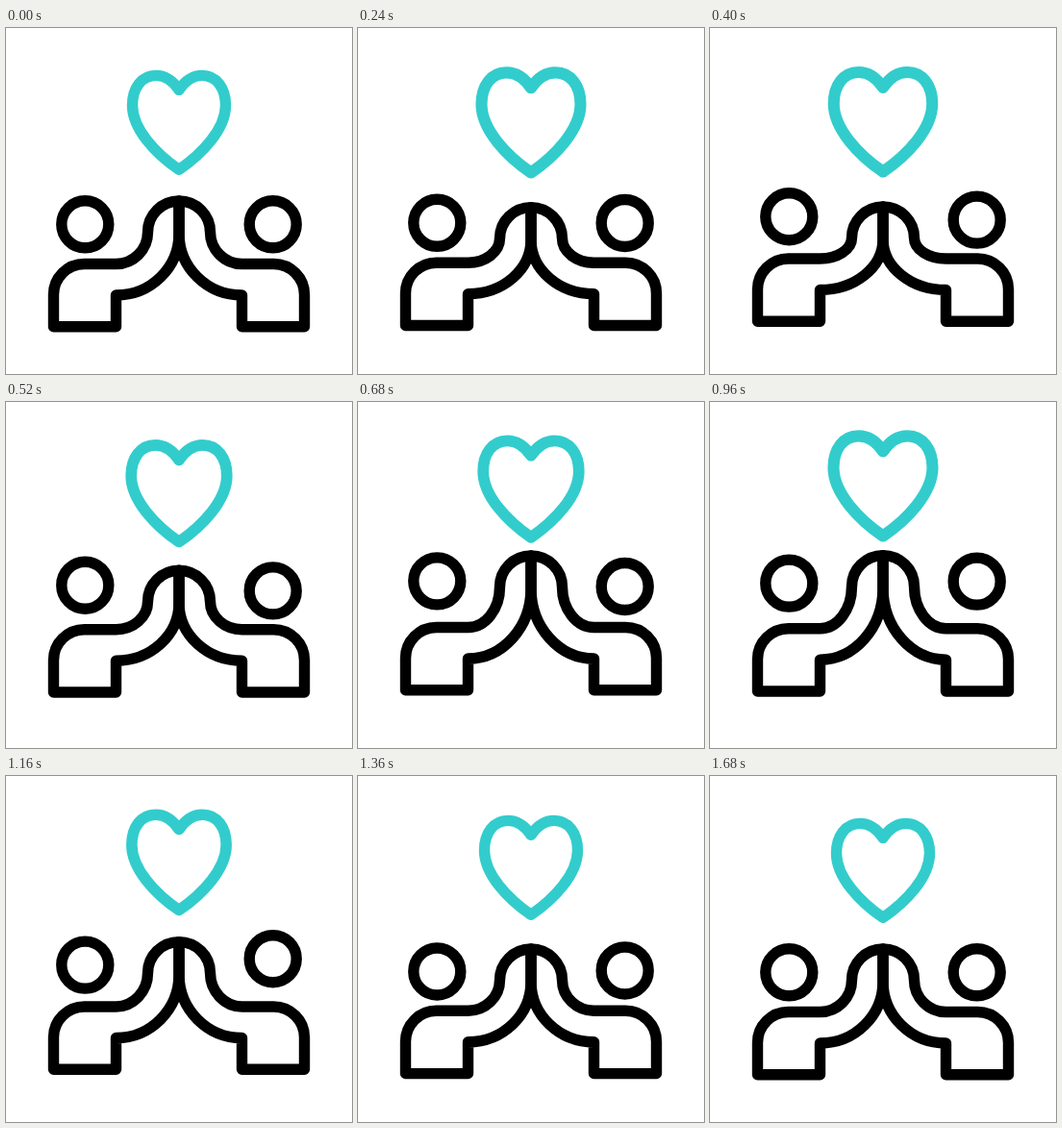
Animation of 360 by 360 pixels, one loop 1.72 s. Source, as an HTML page with a canvas:

```html
<!DOCTYPE html>
<html>
<head>
<meta charset="utf-8">
<style>
html, body { margin: 0; width: 100%; height: 100%; overflow: hidden; background: #fff; }
canvas { display: block; }
</style>
</head>
<body>
<canvas id="stage" width="360" height="360"></canvas>
<script>
const ctx = document.getElementById('stage').getContext('2d');
const LOOP = 1720, STEP = 40, HOLD = 80;
const ROUND = 0.5523; // handle length of a quarter circle

function ease(t, from, to) {
  const p = Math.min(1, Math.max(0, (t - from) / (to - from)));
  return p * p * (3 - 2 * p);
}

// Goes from 0 to 1, stays there, and comes back to 0
function swing(t, leave, arrive, turn, settle) {
  return ease(t, leave, arrive) - ease(t, turn, settle);
}

function drawHeart(y, scale) {
  ctx.save();
  ctx.translate(180, y);
  ctx.scale(scale, scale);
  ctx.strokeStyle = '#33cccc';
  ctx.beginPath();
  for (const side of [-1, 1]) {
    ctx.moveTo(0, -34);
    ctx.bezierCurveTo(side * 6, -43, side * 14, -49, side * 24, -49);
    ctx.bezierCurveTo(side * 39, -49, side * 48.5, -36, side * 48.5, -18);
    ctx.bezierCurveTo(side * 48.5, 7, side * 23.5, 33, 0, 49);
  }
  ctx.stroke();
  ctx.restore();
}

function drawPerson(mirrored, body, hands, head) {
  const palmX = 147.5, sideX = 49.5, elbowX = 114.5, middle = 180;
  const top = 180 + hands, palm = 212.5 + hands, wrist = palm + 1.5;
  const shoulder = 245.5 + body, waist = 278 + body, base = 310.8 + body;
  const handle = ROUND * (middle - palmX);

  ctx.save();
  if (mirrored) {
    ctx.translate(360, 0);
    ctx.scale(-1, 1);
  }
  ctx.strokeStyle = '#000';
  ctx.beginPath();
  ctx.arc(82.3, 204.3 + head, 24.5, 0, Math.PI * 2);
  ctx.stroke();

  ctx.beginPath();
  ctx.moveTo(middle, top);
  ctx.bezierCurveTo(middle - handle, top, palmX, palm - handle, palmX, palm);
  ctx.bezierCurveTo(palmX, palm + ROUND * (shoulder - palm),
    elbowX + handle, shoulder, elbowX, shoulder);
  ctx.arcTo(sideX, shoulder, sideX, waist, 32);
  ctx.lineTo(sideX, base);
  ctx.lineTo(elbowX, base);
  ctx.lineTo(elbowX, waist);
  ctx.bezierCurveTo(elbowX + ROUND * (middle - elbowX), waist,
    middle, wrist + ROUND * (waist - wrist), middle, wrist);
  ctx.closePath();
  ctx.stroke();
  ctx.restore();
}

function draw(now) {
  const stepped = Math.floor((now % LOOP) / STEP) * STEP;
  const t = stepped < HOLD ? 0 : stepped;

  const body = -11 * swing(t, 120, 680, 820, 1500);
  const dip = 7 * swing(t, 0, 280, 360, 720);
  const hands = dip - 21 * swing(t, 360, 720, 920, 1320);
  const leftHead = -18 * swing(t, 140, 700, 820, 1440);
  const rightHead = -18 * swing(t, 80, 1040, 1040, 1440);
  const heartY = 98.4 - 11 * swing(t, 320, 880, 980, 1560);
  // Two beats, then rest
  const beat = t < 1200 ? Math.abs(Math.sin(Math.PI * t / 600)) : 0;

  ctx.fillStyle = '#fff';
  ctx.fillRect(0, 0, 360, 360);
  ctx.lineWidth = 11.4;
  ctx.lineCap = ctx.lineJoin = 'round';
  drawHeart(heartY, 1 + 0.065 * beat);
  drawPerson(false, body, hands, leftHead);
  drawPerson(true, body, hands, rightHead);
}

let start = null;
function tick(now) {
  start ??= now;
  draw(now - start);
  requestAnimationFrame(tick);
}
draw(0);
requestAnimationFrame(tick);
</script>
</body>
</html>
```
